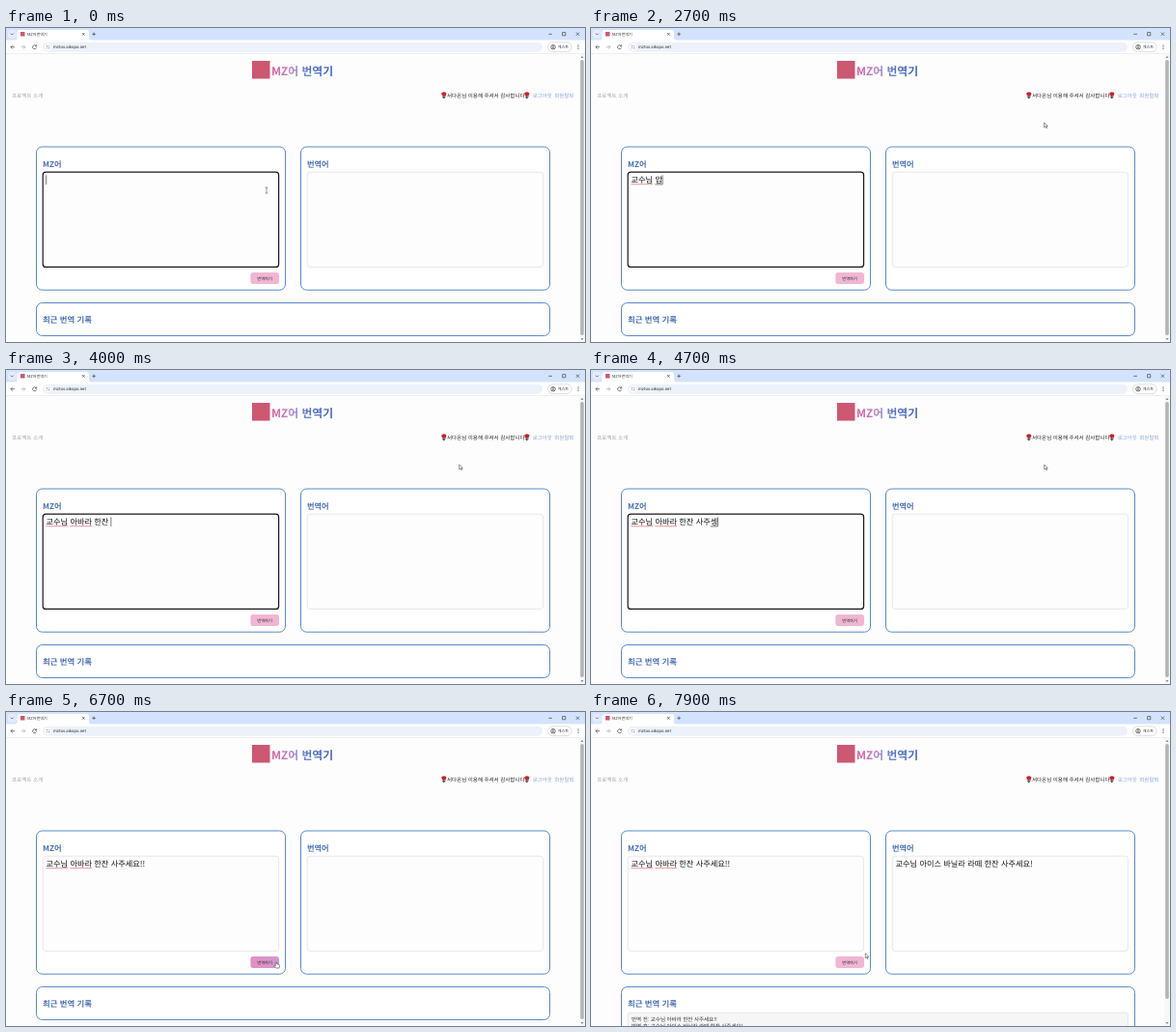
An HTML page that plays this animation: 600x325 px, repeating every 8000 ms.

```html
<!DOCTYPE html>
<html lang="ko">
<head>
<meta charset="utf-8">
<title>MZ어번역기</title>
<style>
  html, body { margin: 0; width: 100%; height: 100%; overflow: hidden; background: #fdfdfe; }
  svg { display: block; width: 100%; height: 100%; }
  text { font-family: "Noto Sans CJK KR", "Noto Sans CJK", sans-serif; white-space: pre; text-rendering: geometricPrecision; }
  .head { font-size: 8.2px; font-weight: 700; fill: #4a6fb8; }
  .body { font-size: 8.2px; fill: #111; }
  .nav { font-size: 5.5px; }
  .link { fill: #8aa6d6; }
  .card { fill: #fff; stroke: #5a89c8; stroke-width: 1; }
  .field { fill: #fdfdfd; stroke: #d9d9dc; stroke-width: .6; }
  .line { fill: none; stroke: #444; stroke-width: .7; }
  .spell { stroke: #d8575c; stroke-width: .6; }
</style>
</head>
<body>
<svg viewBox="0 0 600 325" preserveAspectRatio="none">
  <defs>
    <linearGradient id="titleFill" gradientUnits="userSpaceOnUse" x1="275" y1="0" x2="338" y2="0">
      <stop offset="0" stop-color="#d4609a"/>
      <stop offset=".28" stop-color="#c67fc0"/>
      <stop offset=".45" stop-color="#8b90d6"/>
      <stop offset=".62" stop-color="#5576c8"/>
      <stop offset="1" stop-color="#4163bf"/>
    </linearGradient>
    <linearGradient id="hoverFill">
      <stop offset="0" stop-color="#e38fc0"/>
      <stop offset="1" stop-color="#d397d2"/>
    </linearGradient>
    <g id="rose">
      <path d="M2.8 3.5V7.2" stroke="#4a2a2a" stroke-width="1"/>
      <path d="M2.8 6.3L.9 4.8M2.8 6.3L4.7 4.8" stroke="#5a2b2f" stroke-width=".9"/>
      <path d="M.3 1.2Q2.8-.8 5.3 1.2Q5.4 4.3 2.8 4.6Q.2 4.3 .3 1.2Z" fill="#c8202f"/>
    </g>
  </defs>

  <!-- browser window -->
  <rect width="600" height="13" fill="#d3e3fd"/>
  <rect x="2" y="2" width="8.5" height="8.5" rx="2.5" fill="#e3edfd"/>
  <path class="line" d="M4.8 5.6l1.5 1.5 1.5-1.5"/>
  <path d="M8 13Q11.5 13 11.5 10V5Q11.5 2 14.5 2H83Q86 2 86 5V10Q86 13 89.500 13Z" fill="#fff"/>
  <rect x="15" y="4" width="4.500" height="4.500" fill="#cc5872"/>
  <text x="22" y="8" font-size="4.100" fill="#333">MZ어번역기</text>
  <path class="line" d="M79 5l2.600 2.600M81.600 5l-2.600 2.600M89.300 6.300h3.600M91.100 4.500v3.600"/>
  <path class="line" d="M562.300 6.300h3.600M576.600 4.600h3.200v3.200h-3.200zM590.800 4.600l3.300 3.300M594.100 4.600l-3.300 3.300"/>
  <rect y="12.500" width="600" height="14" fill="#fff"/>
  <path class="line" d="M9 19.700H5M6.900 17.700L4.900 19.700L6.900 21.700"/>
  <path class="line" style="stroke:#aaa" d="M15.800 19.700H19.800M17.900 17.700L19.900 19.700L17.900 21.700"/>
  <path class="line" d="M31.300 18.700A2 2 0 1 0 31.500 20.400M31.700 17.300V18.900H30.100"/>
  <rect x="38" y="14.700" width="518" height="10" rx="5" fill="#edf2fa"/>
  <circle cx="43.500" cy="19.700" r="3.500" fill="#fff"/>
  <path class="line" style="stroke-width:.6" d="M41.700 18.700h1.700M44.500 18.700h.9M41.700 20.800h.9M43.700 20.800h1.700"/>
  <text x="49" y="21.300" font-size="4.400" fill="#333" style="font-family:Roboto,sans-serif">mztos.aikopo.net</text>
  <rect x="561.500" y="14.800" width="24.500" height="9.800" rx="4.900" fill="#fff" stroke="#c5cad3" stroke-width=".6"/>
  <circle class="line" cx="567" cy="19.700" r="2.300"/>
  <circle cx="567" cy="19" r=".8" fill="#444"/>
  <path d="M565.500 21.200q1.500-1.300 3 0" class="line"/>
  <text x="571.800" y="21.300" font-size="4.100" fill="#333">게스트</text>
  <g fill="#444"><circle cx="593" cy="17.900" r=".55"/><circle cx="593" cy="19.700" r=".55"/><circle cx="593" cy="21.500" r=".55"/></g>
  <path d="M0 26.500H600" stroke="#e3e6ea" stroke-width=".6"/>

  <!-- page head -->
  <rect x="255" y="34" width="18.500" height="18.500" fill="#cc5872"/>
  <text x="275" y="48.800" font-size="11.800" font-weight="700" fill="url(#titleFill)">MZ어 번역기</text>
  <text class="nav" x="6.300" y="71.500" fill="#a3a3a8">프로젝트 소개</text>
  <use href="#rose" x="451" y="66"/>
  <text class="nav" x="457" y="71.500" fill="#222">서다온님 이용해 주셔서 감사합니다</text>
  <use href="#rose" x="537" y="66"/>
  <text class="nav link" x="545.700" y="71.500">로그아웃</text>
  <text class="nav link" x="568.300" y="71.500">회원탈퇴</text>

  <!-- cards -->
  <rect class="card" x="31.500" y="123" width="258" height="148.200" rx="6"/>
  <rect class="card" x="305.500" y="123" width="258" height="148.200" rx="6"/>
  <rect class="card" id="history" x="31.500" y="284.500" width="532" height="34" rx="6"/>
  <text class="head" x="38" y="143.700">MZ어</text>
  <text class="head" x="312" y="143.700">번역어</text>
  <text class="head" x="38" y="305" style="font-size:8.400px">최근 번역 기록</text>
  <rect class="field" id="input" x="38.200" y="149.200" width="244.400" height="98.200" rx="3"/>
  <rect class="field" x="312.200" y="149.200" width="244.400" height="98.200" rx="3"/>
  <rect id="button" x="253.400" y="253" width="29.600" height="12" rx="3"/>
  <text x="260.200" y="260.700" font-size="4.300" fill="#222">번역하기</text>

  <text class="body" id="typed" x="41.500" y="160.100"></text>
  <path class="spell" id="spell1"/>
  <path class="spell" id="spell2"/>
  <path id="compose" stroke="#222" stroke-width=".6"/>
  <path id="caret" stroke="#222" stroke-width=".6"/>

  <g id="result">
    <text class="body" x="315.500" y="160.100">교수님 아이스 바닐라 라떼 한잔 사주세요!</text>
    <rect x="38.200" y="311.300" width="518.400" height="30" rx="2.500" fill="#f6f6f7" stroke="#d9d9dc" stroke-width=".6"/>
    <text class="nav" x="42" y="320.300" fill="#333">번역 전: 교수님 아바라 한잔 사주세요!!</text>
    <text class="nav" x="42" y="327" fill="#333">번역 후: 교수님 아이스 바닐라 라떼 한잔 사주세요!</text>
  </g>

  <!-- scrollbar -->
  <rect x="594" y="26.800" width="6" height="298.200" fill="#f7f7f8"/>
  <path d="M595.500 31L597 28.800L598.500 31ZM595.500 321L597 323.200L598.500 321Z" fill="#8f8f8f"/>
  <rect id="thumb" x="595.200" y="33" width="3.600" rx="1.800" fill="#b4b4b6"/>

  <!-- pointers, hotspot at 0,0 -->
  <g id="beam"><path d="M-1.300-3H1.300M0-3V3M-1.300 3H1.300" fill="none" stroke="#555" stroke-width=".6"/></g>
  <g id="arrow"><path d="M0 0V4.900L1.200 3.800L2.100 5.700L2.900 5.300L2.100 3.500H3.600Z" fill="#fff" stroke="#222" stroke-width=".5"/></g>
  <g id="hand"><path d="M-.6 .4Q0-.4 .6 .4V2.500Q2-.1+2.500 2.600 2.600Q3.600 2.700 3.600 3.700V5Q3.400 6.800 1.800 6.800H.3Q-.8 6.500-2.400 4Q-2.100 3-.6 4Z" fill="#fff" stroke="#222" stroke-width=".5"/></g>
</svg>
<script>
const $ = id => document.getElementById(id);
const show = (id, on) => $(id).setAttribute("visibility", on ? "visible" : "hidden");
const set = (id, attrs) => { for (const k in attrs) $(id).setAttribute(k, attrs[k]); };

const LOOP = 8000, STEP = 100, TEXT_X = 41.5;
const BLUR = 6700, RESULT = 7000;
const MESSAGE = "교수님 아바라 한잔 사주세요!!";

// each burst of keys: start time, then the word being composed, one state per 100 ms
const BURSTS = [
  [1400, "", "ㄱ 교 굣 교수 교순"],
  [2000, "", "교수니 교수님 교수님_ 교수님_ㅇ"],
  [2500, "교수님 ", "아 아 압 아바 아발 아바라 아바라_ 아바라_ㅎ 아바라_하 아바라_한 아바라_핝"],
  [3700, "교수님 아바라 ", "한자 한잔 한잔_"],
  [4100, "교수님 아바라 한잔 ", "ㅅ 사 샂 사주 사줏 사주세 사주셍 사주세요 사주세요! 사주세요!!"]
];
const KEYS = BURSTS.flatMap(([start, before, words]) =>
  words.split(" ").map((w, i) => ({ at: start + i * STEP, text: before + w.replace("_", " ") })));

const CARET_OFF = [[500, 1000], [5400, 5600], [6100, 6600]];
const within = (v, [a, b]) => v >= a && v < b;

// pointer moves: start, end, from, to
const MOVES = [
  [400, 1100, [270, 168], [469.7, 98]],
  [5900, 6700, [469.7, 98], [280, 258.5]],
  [7500, 7600, [280, 258.5], [280.5, 258.2]],
  [7700, 7900, [280.5, 258.2], [284.3, 249.8]]
];
const ease = p => p < .5 ? 4 * p ** 3 : 1 - (2 - 2 * p) ** 3 / 2;

function pointerAt(t) {
  let pos = MOVES[0][2];
  for (const [start, end, from, to] of MOVES) {
    if (t < start) break;
    const p = ease(Math.min(1, (t - start) / (end - start)));
    pos = from.map((v, i) => v + (to[i] - v) * p);
  }
  return pos;
}

const inBox = ([x, y], l, t, r, b) => x > l && x < r && y > t && y < b;

function widthOf(text) {
  $("typed").textContent = text;
  return text ? $("typed").getComputedTextLength() : 0;
}

function drawText(t) {
  const text = KEYS.reduce((last, k) => t >= k.at ? k.text : last, "");
  const underline = (id, from, to, y) => {
    const a = TEXT_X + widthOf(text.slice(0, from)), b = TEXT_X + widthOf(text.slice(0, to));
    set(id, { d: `M${a} ${y}H${b}` });
  };
  const composing = /[ㄱ-ㅎ가-힣]$/.test(text) && t < 5000;
  show("spell1", text.length > 3);
  show("spell2", text.length > 7);
  show("compose", composing);
  underline("spell1", 0, 3, 161.7);
  underline("spell2", 4, 7, 161.7);
  underline("compose", Math.max(0, text.length - 1), text.length, 161.9);
  const x = TEXT_X + widthOf(text) + .2;
  set("caret", { d: `M${x} 152.300V162` });
  show("caret", t < BLUR && !CARET_OFF.some(span => within(t, span)));
}

function drawPointer(t) {
  const pos = pointerAt(t);
  const onButton = inBox(pos, 253.4, 253, 283, 265);
  const onText = inBox(pos, 38, 149, 283, 248) || inBox(pos, 312, 149, 557, 248);
  const kind = onButton ? "hand" : onText ? "beam" : "arrow";
  for (const id of ["hand", "beam", "arrow"]) show(id, id === kind);
  set(kind, { transform: `translate(${pos})` });
  set("button", { fill: onButton ? "url(#hoverFill)" : "#f0b6d3" });
}

function draw(ms) {
  const t = Math.floor(ms % LOOP / STEP) * STEP;
  const focused = t < BLUR, done = t >= RESULT;
  $("input").style.cssText = focused ? "stroke:#17171c;stroke-width:1.2" : "";
  drawText(t);
  drawPointer(t);
  show("result", done);
  set("history", { height: done ? 70 : 34 });
  set("thumb", { height: done ? 264 : 285 });
}

// a simple thumb-up hand outline keeps its shape at any scale
set("hand", {});
$("hand").firstChild.setAttribute("d",
  "M-.7 .5Q0-.5 .7 .5V2.400L2.900 2.800Q3.700 3 3.600 3.900L3.100 6.600H-.2L-2.300 4.300Q-2.200 3.200-.7 4.200Z");

const begin = performance.now();
function tick() {
  draw(performance.now() - begin);
  requestAnimationFrame(tick);
}
draw(0);
requestAnimationFrame(tick);
</script>
</body>
</html>
```
